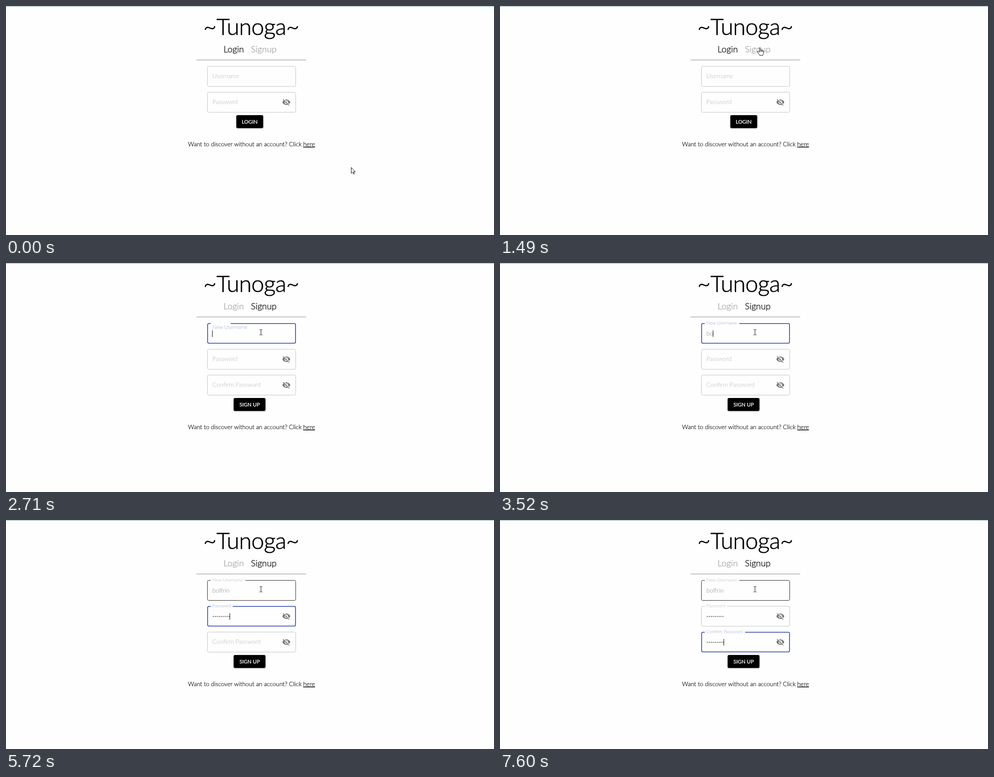
Write an HTML page that moves like this. It is 1089x514 px and loops after 8 s.

```html
<!DOCTYPE html>
<html lang="en">
<head>
<meta charset="utf-8">
<title>Sign up form</title>
<style>
html, body { margin: 0; width: 100%; height: 100%; overflow: hidden; background: #fefefe; }
svg { display: block; width: 1089px; height: 514px; font-family: Lato, "Open Sans", sans-serif; font-weight: 300; }
.mid { text-anchor: middle; }
.title { font-size: 51.2px; letter-spacing: -.6px; stroke: #000; stroke-width: .7px; }
.tab { font-size: 19.7px; fill: #808080; }
.tab.active { fill: #000; stroke: #000; stroke-width: .3px; }
.label, .value { font-size: 13.8px; }
.label { fill: #b4b4b4; }
.value { fill: #80868e; }
.outline { fill: none; stroke: #c2c2c2; }
.hover .outline { stroke: #222; }
.focus .outline { stroke: #3f51b5; stroke-width: 1.8px; }
.focus .label { fill: #959cd2; }
.dots { fill: none; stroke: #000; stroke-width: 1.9px; stroke-linecap: round; }
.caret { fill: #000; }
.button { filter: drop-shadow(0 1px .9px rgba(0, 0, 0, .4)); }
.button-text { font-size: 11.6px; font-weight: 400; fill: #fff; stroke: #fff; stroke-width: .3px; }
.note { font-size: 13.6px; stroke: #000; stroke-width: .2px; }
.cursor { fill: #fff; stroke: #000; stroke-linejoin: round; }
</style>
</head>
<body>
<svg viewBox="0 0 1089 514" xmlns="http://www.w3.org/2000/svg">
  <defs>
    <g id="eye">
      <path fill="#757575" d="M1 12C2.7 7.6 7 4.5 12 4.5s9.3 3.1 11 7.5c-1.7 4.4-6 7.5-11 7.5S2.7 16.4 1 12z"/>
      <circle cx="12" cy="12" r="5" fill="#fefefe"/>
      <circle cx="12" cy="12" r="3" fill="#757575"/>
      <path stroke="#fefefe" stroke-width="1.8" d="M3.9 2.4 21.6 20.1"/>
      <path stroke="#757575" stroke-width="1.8" d="M2.6 3.6 20.4 21.4"/>
    </g>
  </defs>
  <rect width="1089" height="1" fill="#7d9fa2"/>
  <text class="title mid" x="547.3" y="65">~Tunoga~</text>
  <text class="tab" id="loginTab" x="485.5" y="104">Login</text>
  <text class="tab" id="signupTab" x="546.5" y="104">Signup</text>
  <rect x="425" y="120.6" width="245" height="1" fill="#858585"/>
  <g id="fields"></g>
  <g id="footer">
    <rect class="button" id="button" y="245" height="29" rx="3.2"/>
    <text class="button-text mid" id="buttonText" x="543.7" y="264"></text>
    <text class="note mid" x="547.7" y="315">Want to discover without an account? Click <tspan text-decoration="underline">here</tspan></text>
  </g>
  <g id="cursor">
    <path class="cursor" id="arrow" d="M.5.5V13.7l3-2.8 2.3 4.6 1.8-.8-2.1-4.5h4.1z"/>
    <path class="cursor" id="hand" d="M-1.3 11V1.6c0-1.6 2.4-1.6 2.4 0V6.4c.2-1.2 2.3-1.1 2.4.3.2-1.1 2.2-.9 2.3.5.3-1 2.2-.7 2.2.8V12.5c0 2-1.5 3-1.5 5.5H-.3c0-2-3.6-4.5-5-7.6-.9-2 1.2-2.6 2.2-1.2z M1.1 6.4V9.6M3.5 6.7V9.8M5.8 7.2V10"/>
    <path id="beam" fill="none" stroke="#000" d="M-3-6h2l1 1 1-1h2M0-5V5M-3 6h2l1-1 1 1h2"/>
  </g>
</svg>
<script>
const LOOP = 8000, SIGNUP = 2070, SHIFT = 58;
const LEFT = 449.5, RIGHT = 646.5, HEIGHT = 45, TEXT_X = 460.5, DOT_GAP = 4.37;
const USER = 'bolfrin';
const $ = id => document.getElementById(id);
const show = (el, on) => el.setAttribute('visibility', on ? 'visible' : 'hidden');

// n evenly spaced moments from a to b
const seq = (a, b, n) => Array.from({length: n}, (_, i) => a + (b - a) * i / (n - 1));
const count = (times, t) => times.filter(x => x <= t).length;
const stepped = (t, a, b, n) => count(seq(a, b, n), t + .01) / n;

const fields = [
  {name: 'New Username', top: 135.5, gap: 77, focus: [2692, 2890, 4], blur: 4440,
   keys: [3400, 3520, 3670, ...seq(3960, 4220, 4)]},
  {name: 'Password', top: 193.5, gap: 49, focus: [4440, 4680, 5], blur: 5930, secret: true,
   keys: [...seq(4970, 5200, 4), ...seq(5370, 5500, 3), 5660, 5720]},
  {name: 'Confirm Password', top: 251.5, gap: 90, focus: [5930, 6170, 5], blur: LOOP, secret: true,
   keys: [...seq(6530, 6700, 3), 6870, 6930, ...seq(7340, 7600, 4)]}
];

// pointer moves: start, end, steps, control point, end point
const home = [770, 362];
const moves = [
  [560, 700, 4, [768, 312], [756, 253]],
  [950, 1490, 10, [631, 94], [580, 93]],
  [2230, 2626, 7, [570, 118], [569, 155]]
];

for (const f of fields) {
  const g = document.createElementNS('http://www.w3.org/2000/svg', 'g');
  g.innerHTML = `<path class="outline"/><text class="label">${f.name}</text>` +
    `<text class="value" x="${TEXT_X}" y="${f.top + 27}"></text><path class="dots" stroke-dasharray="0 ${DOT_GAP}"/>` +
    `<rect class="caret" y="${f.top + 15.5}" width="1" height="15"/>` +
    (f.secret ? `<use href="#eye" transform="translate(616 ${f.top + 12.8}) scale(.8)"/>` : '');
  $('fields').append(g);
  f.el = g;
  for (const part of ['outline', 'label', 'value', 'dots', 'caret']) f[part] = g.querySelector('.' + part);
}

function outlinePath(top, inset, gap) {
  const l = LEFT + inset, r = RIGHT - inset, y = top + inset, b = top + HEIGHT - inset;
  return `M${457 + gap} ${y}H${r - 3}a3 3 0 0 1 3 3V${b - 3}a3 3 0 0 1-3 3` +
    `H${l + 3}a3 3 0 0 1-3-3V${y + 3}a3 3 0 0 1 3-3H457`;
}

function pointer(t) {
  let from = home;
  for (const [a, b, n, ctrl, to] of moves) {
    if (t < a) break;
    const p = stepped(t, a, b, n), q = 1 - p;
    from = from.map((v, i) => q * q * v + 2 * p * q * ctrl[i] + p * p * to[i]);
  }
  return from;
}

function drawField(f, t, hover) {
  const focused = t >= f.focus[0] && t < f.blur;
  const p = 1 - (1 - stepped(t, ...f.focus)) ** 3;
  const typed = count(f.keys, t);
  f.el.setAttribute('class', focused ? 'focus' : hover ? 'hover' : '');
  f.outline.setAttribute('d', outlinePath(f.top, focused ? .4 : 0, f.gap * p));
  f.label.setAttribute('transform', `translate(${TEXT_X} ${f.top + 26.5 - 23.8 * p}) scale(${1 - .25 * p})`);

  let width = typed * DOT_GAP;
  if (f.secret) {
    f.dots.setAttribute('d', typed ? `M462.6 ${f.top + 23}h${(typed - 1) * DOT_GAP + .05}` : '');
  } else {
    f.value.textContent = USER.slice(0, typed);
    width = typed ? f.value.getComputedTextLength() : 0;
  }
  f.caret.setAttribute('x', Math.round(TEXT_X - .5 + width));
  show(f.caret, focused && !(t >= 3280 && t < 3400));
}

function draw(t) {
  const signup = t >= SIGNUP;
  $('loginTab').classList.toggle('active', !signup);
  $('signupTab').classList.toggle('active', signup);
  fields[0].label.textContent = signup ? 'New Username' : 'Username';
  fields[2].el.style.display = signup ? '' : 'none';
  $('footer').setAttribute('transform', `translate(0 ${signup ? SHIFT : 0})`);
  $('button').setAttribute('x', signup ? 508 : 514);
  $('button').setAttribute('width', signup ? 71 : 60);
  $('buttonText').textContent = signup ? 'SIGN UP' : 'LOGIN';

  const [x, y] = pointer(t);
  const overField = x > LEFT && x < RIGHT && y > 135 && y < 181;
  const overTab = x > 546 && x < 604 && y > 86 && y < 110;
  $('cursor').setAttribute('transform', `translate(${Math.round(x)} ${Math.round(y) + (overField ? .5 : 0)})`);
  show($('arrow'), !overField && !overTab);
  show($('hand'), overTab);
  show($('beam'), overField);
  fields.forEach((f, i) => drawField(f, t, overField && i === 0));
}

const start = performance.now();
function tick() {
  draw((performance.now() - start) % LOOP);
  requestAnimationFrame(tick);
}
tick();
</script>
</body>
</html>
```
